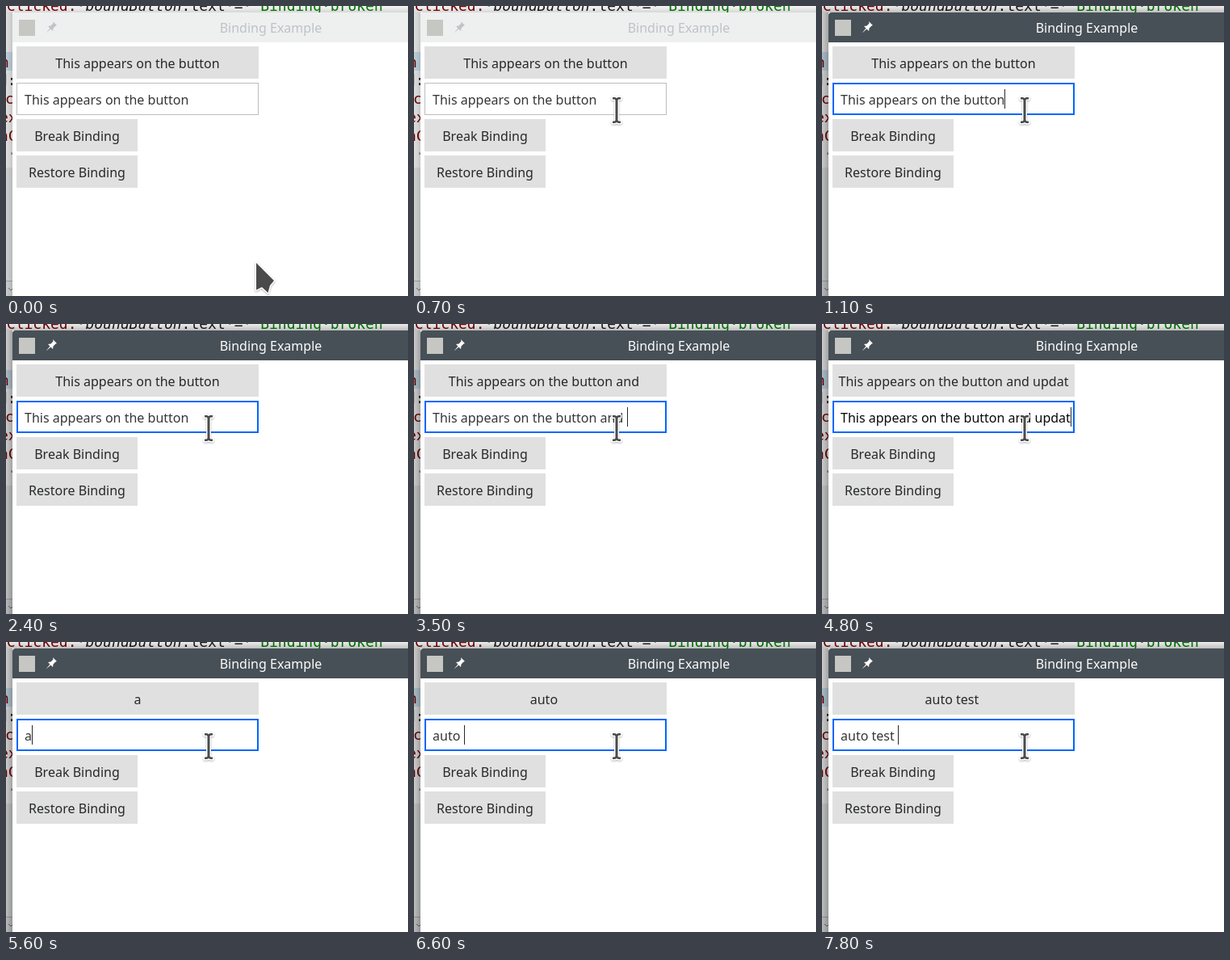
An HTML page that plays this animation: 498 by 359 pixels, repeating every 8 s.

```html
<!DOCTYPE html>
<html lang="en">
<head>
<meta charset="utf-8">
<title>Binding Example</title>
<style>
  html, body { margin: 0; width: 100%; height: 100%; overflow: hidden; background: #fff; }
  svg { display: block; width: 498px; height: 359px; font: 16.03px "Noto Sans", sans-serif; }
  text { white-space: pre; fill: #26282a; }
  .mid { text-anchor: middle; }
  .code text { font: 18px "DejaVu Sans Mono", monospace; fill: #1f1c1b; }
  .code .name { fill: #800000; }
  .code .string { fill: #008000; }
  .code .space { fill: #9a9a9a; }
  .code .ref { font-style: italic; }
  .button { fill: #e0e0e0; }
  .ink { fill: #4a4a4a; stroke: #fff; stroke-width: 3px; paint-order: stroke; stroke-linejoin: round; }
  #cursor { filter: drop-shadow(0 1px 1px rgba(0, 0, 0, .3)); }
</style>
</head>
<body>
<svg viewBox="0 0 498 359">
  <defs>
    <linearGradient id="sideShade"><stop offset="0" stop-opacity=".55"/><stop offset="1"/></linearGradient>
    <linearGradient id="topShade" x2="0" y2="1"><stop offset="0" stop-opacity=".2"/><stop offset="1" stop-opacity=".7"/></linearGradient>
  </defs>

  <!-- editor behind the window -->
  <g class="code">
    <rect width="498" height="359" fill="#fff"/>
    <rect y="57" width="9" height="23" fill="#d5ebf8"/>
    <rect y="200" width="9" height="159" fill="#eceeef"/>
    <rect x="-1" y="340.500" width="10" height="19" fill="#e6e8e9" stroke="#b4b7b9"/>
    <path d="M3 349l3 3 3-3" fill="none" stroke="#777"/>
    <text x="-10" y="6" xml:space="preserve"><tspan class="name">nClicked:</tspan><tspan class="space">·</tspan><tspan class="ref">boundButton</tspan>.text<tspan class="space">·</tspan>=<tspan class="space">·</tspan><tspan class="string">"Binding·broken"</tspan></text>
    <text class="name" x="-7" y="76">n</text>
    <text x="-9" y="98">d:</text>
    <text class="name" x="-1" y="121">c</text>
    <text class="name" x="-8" y="144">ex</text>
    <text class="name" x="-8" y="167">nC</text>
    <text class="space" x="2" y="189">·</text>
  </g>
  <g id="shade">
    <rect width="8" y="8" height="351" fill="url(#sideShade)"/>
    <rect width="498" height="8" fill="url(#topShade)"/>
  </g>

  <!-- window -->
  <path id="titleBar" d="M8 46V12q0-4 4-4H498V46z"/>
  <rect x="8" y="45" width="490" height="314" fill="#fff"/>
  <rect x="16" y="17" width="20" height="20" fill="#c6c6c2"/>
  <g id="titleInk">
    <path d="M58 19l5 5-1.500.500-3 3-.500 3.500-2.500-2.500-6 5 5-6-2.500-2.500 3.500-.500 3-3z"/>
    <text id="title" class="mid" x="328" y="33" style="fill:inherit">Binding Example</text>
  </g>

  <rect class="button" x="13" y="50" width="300" height="40"/>
  <text id="label" class="mid" x="163" y="77" xml:space="preserve"></text>
  <rect id="field" fill="#fff"/>
  <rect id="selection" x="23" y="103" height="24" fill="#0066ff"/>
  <text id="input" x="23" y="122" xml:space="preserve"></text>
  <rect id="caret" y="103" width="1" height="24" fill="#26282a"/>
  <rect class="button" x="13" y="140" width="150" height="40"/>
  <text class="mid" x="88" y="167">Break Binding</text>
  <rect class="button" x="13" y="185" width="150" height="40"/>
  <text class="mid" x="88" y="212">Restore Binding</text>

  <g id="cursor">
    <path id="arrow" class="ink" d="M0 1V34.500L7 31 14.500 38 17 29 22 23z"/>
    <path id="beam" class="ink" d="M-5-16H-2L0-15 2-16H5V-13.500H2.500L1.500-12.500V12.500L2.500 13.500H5V16H2L0 15-2 16H-5V13.500H-2.500L-1.500 12.500V-12.500L-2.500-13.500H-5z"/>
  </g>
</svg>

<script>
const LOOP = 8000;
const FOCUS = 1000;
const SELECT = { ink: 4800, fill: 5200, end: 5600 };
const BASE = "This appears on the button";

// [time, field text]
const typing = [
  [0, BASE], [3000, BASE + " "],
  [3300, BASE + " a"], [3400, BASE + " an"], [3500, BASE + " and "],
  [3800, BASE + " and u"],
  [4100, BASE + " and up"], [4200, BASE + " and upd"], [4300, BASE + " and upda"],
  [4500, BASE + " and updat"],
  [5600, "a"], [5700, "au"], [5900, "auto"], [6600, "auto "],
  [7500, "auto t"], [7600, "auto te"], [7700, "auto test"], [7800, "auto test "]
];

// spans in which the caret is hidden
const caretOff = [[0, 1100], [1600, 1900], [2400, 2800], [6400, 6600], [7100, 7500]];

const el = id => document.getElementById(id);
const within = (t, from, to) => t >= from && t < to;
const clamp = x => Math.min(1, Math.max(0, x));
const mix = (a, b, p) => a + (b - a) * p;
const mixColor = (a, b, p) => `rgb(${a.map((v, i) => Math.round(mix(v, b[i], p)))})`;
const set = (id, attrs) => {
  for (const name in attrs) el(id).setAttribute(name, attrs[name]);
};
const show = (id, on) => set(id, { visibility: on ? "visible" : "hidden" });

function drawTitle(t) {
  const active = t < FOCUS ? 0 : t < FOCUS + 100 ? 0.6 : 1;
  set("titleBar", { fill: mixColor([238, 240, 239], [71, 80, 87], active) });
  set("titleInk", { fill: mixColor([189, 195, 199], [252, 252, 252], active) });
  set("shade", { opacity: mix(0.22, 0.36, active) });
}

function drawField(t) {
  const focused = t >= FOCUS;
  const line = focused ? 2 : 1;
  set("field", {
    x: 13 + line / 2, y: 95 + line / 2, width: 300 - line, height: 40 - line,
    stroke: focused ? "#0066ff" : "#bdbdbd", "stroke-width": line
  });

  const text = typing.filter(([at]) => at <= t).pop()[1];
  for (const id of ["label", "input"]) {
    if (el(id).textContent !== text) el(id).textContent = text;
  }
  const width = el("input").getComputedTextLength();
  el("input").style.fill = within(t, SELECT.ink, SELECT.end) ? "#090909" : "#353637";
  set("selection", { width });
  show("selection", within(t, SELECT.fill, SELECT.end));
  set("caret", { x: Math.round(23 + width) });
  show("caret", !caretOff.some(span => within(t, ...span)));
}

function drawCursor(t) {
  const p = clamp((Math.floor(t / 100) - 1) / 6);
  const eased = p * p * (3 - 2 * p);
  const x = mix(310, 251, eased);
  const y = mix(317, 129, eased);
  const overField = y < 135;
  set("cursor", { transform: `translate(${x} ${y})` });
  show("arrow", !overField);
  show("beam", overField);
}

const start = performance.now();
function draw() {
  const t = (performance.now() - start) % LOOP;
  drawTitle(t);
  drawField(t);
  drawCursor(t);
  requestAnimationFrame(draw);
}
draw();
</script>
</body>
</html>
```
